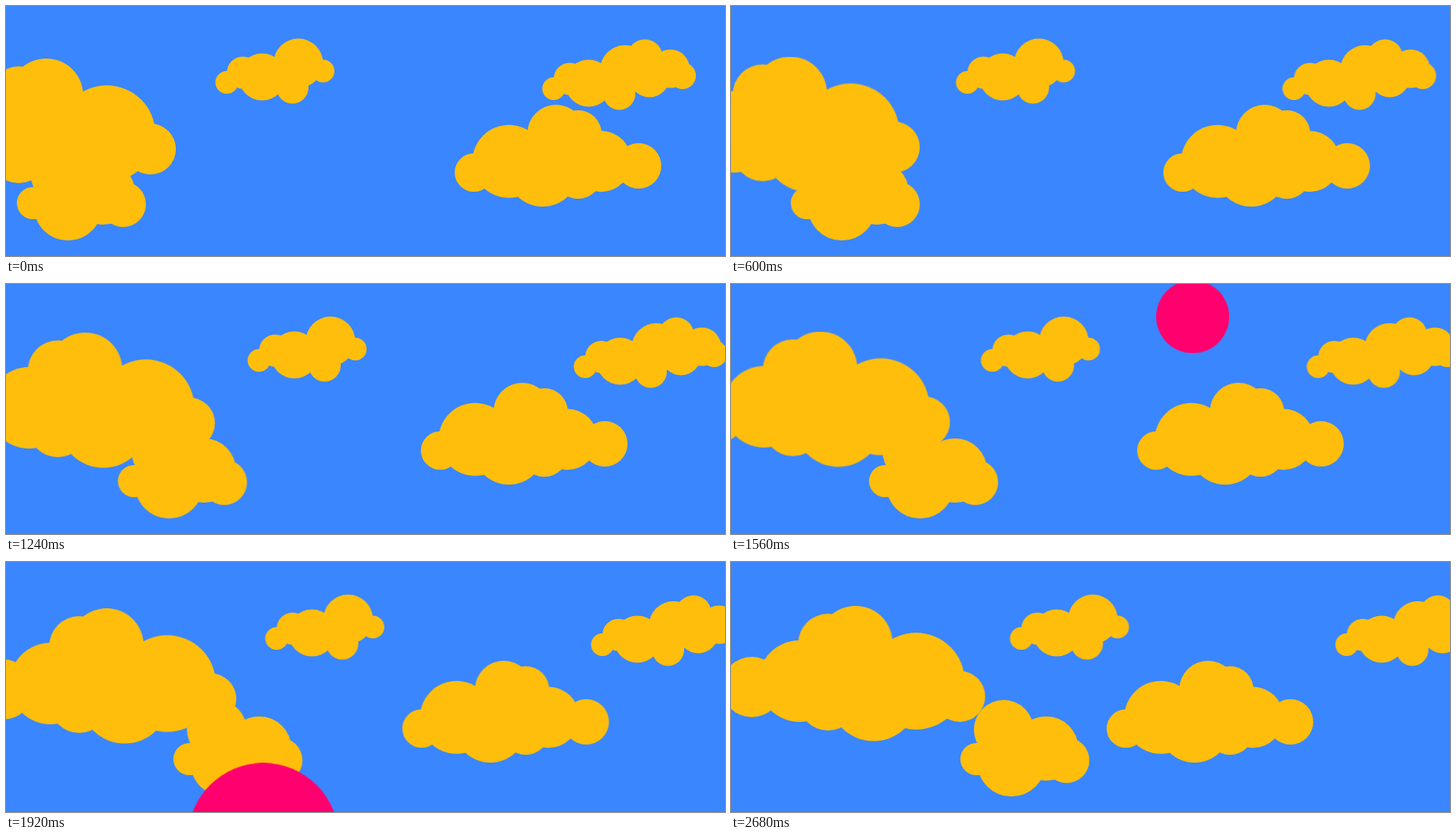
An HTML page for the animation above (2.72 s loop, 915 px wide and 319 px high).

```html
<!DOCTYPE html>
<html lang="en">
<head>
<meta charset="utf-8">
<title>Drifting clouds</title>
<style>
  html, body { margin: 0; width: 100%; height: 100%; overflow: hidden; background: #3a86ff; }
  svg { display: block; width: 915px; height: 319px; }
  .cloud { fill: #ffbe0b; animation: drift 2720ms steps(68) -2ms infinite; }
  .ball { fill: #ff006e; animation: fall 2720ms steps(15) -2ms infinite; }

  @keyframes drift {
    from { transform: translate(0, 0); }
    to { transform: translate(var(--dx), var(--dy, 0px)); }
  }
  /* Waits above the stage, grows while crossing it, then waits below. */
  @keyframes fall {
    0%, 52.9412% { transform: translate(674.2px, -61.8px) scale(.3); }
    75%, 100% { transform: translate(240.8px, 456px) scale(1.125); }
  }
</style>
</head>
<body>
<svg viewBox="0 0 915 319">
  <g class="cloud" style="--dx: 89.8px">
    <circle cx="281" cy="97.5" r="14.5"/>
    <circle cx="301.5" cy="85" r="20.5"/>
    <circle cx="326" cy="90.5" r="30"/>
    <circle cx="372" cy="73" r="31.5"/>
    <circle cx="364.5" cy="104" r="20.5"/>
    <circle cx="403.5" cy="83" r="14.5"/>
  </g>
  <g class="cloud" style="--dx: 87.8px">
    <circle cx="697" cy="105.5" r="14.5"/>
    <circle cx="717.5" cy="93" r="20.5"/>
    <circle cx="741.5" cy="98.5" r="30"/>
    <circle cx="787.5" cy="81.5" r="31.5"/>
    <circle cx="780.5" cy="112" r="20.5"/>
    <circle cx="813" cy="65" r="22.5"/>
    <circle cx="819" cy="91" r="25.5"/>
    <circle cx="845.5" cy="80" r="24.5"/>
    <circle cx="861" cy="89" r="17"/>
  </g>
  <g class="cloud" style="--dx: -94.4px">
    <circle cx="595.5" cy="212.5" r="24.5"/>
    <circle cx="640" cy="198.3" r="46.5"/>
    <circle cx="700" cy="162.5" r="36.5"/>
    <circle cx="683" cy="210" r="46"/>
    <circle cx="728" cy="163" r="30"/>
    <circle cx="728" cy="216" r="30"/>
    <circle cx="757" cy="198.2" r="39"/>
    <circle cx="805" cy="204" r="29"/>
  </g>
  <g class="cloud" style="--dx: 108.9px; --dy: -11.2px">
    <circle cx="-80.8" cy="170.5" r="38.5"/>
    <circle cx="-20.3" cy="163" r="52"/>
    <circle cx="16.2" cy="115" r="38"/>
    <circle cx="16.2" cy="189" r="37"/>
    <circle cx="51.2" cy="114" r="47"/>
    <circle cx="74.2" cy="182.5" r="57"/>
    <circle cx="128.2" cy="163" r="61.8"/>
    <circle cx="183.7" cy="182.5" r="32.5"/>
  </g>
  <g class="cloud" style="--dx: 282.1px">
    <circle cx="34.3" cy="251.5" r="20.5"/>
    <circle cx="69.1" cy="214" r="38"/>
    <circle cx="78.9" cy="255.7" r="43.5"/>
    <circle cx="123.1" cy="238" r="41"/>
    <circle cx="149.1" cy="253" r="29"/>
  </g>
  <circle class="ball" r="100"/>
</svg>
</body>
</html>
```
